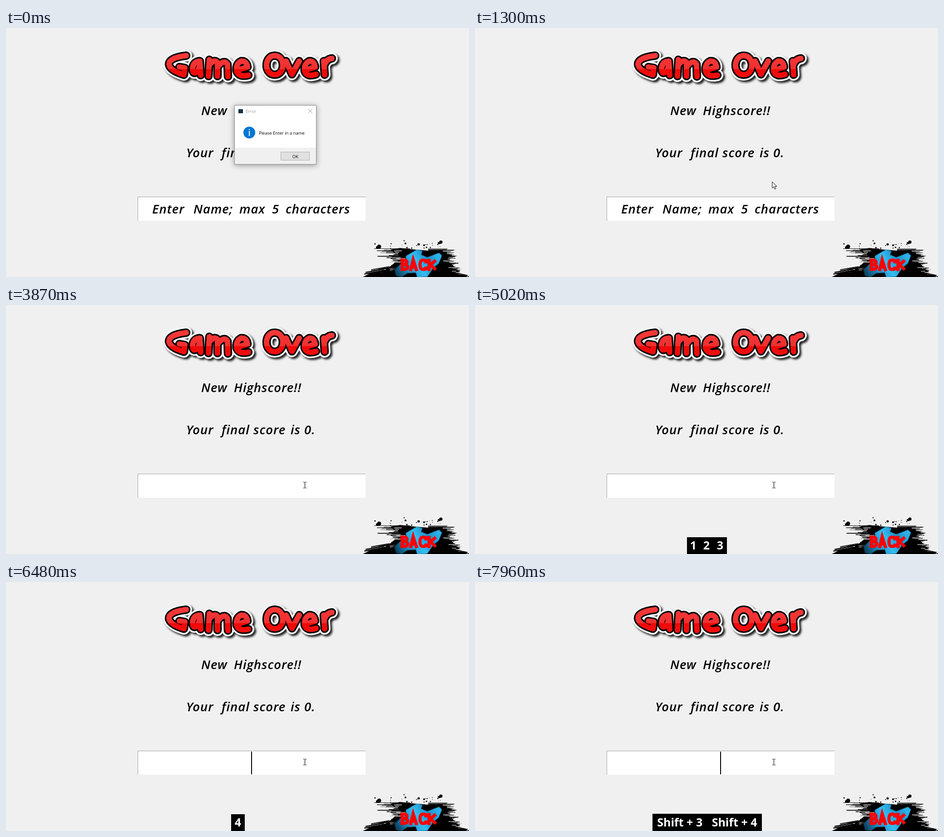
These frames come from a looping animation (1020 by 549 pixels, 8000 ms). An HTML page with a canvas:

```html
<!DOCTYPE html>
<html lang="en">
<head>
<meta charset="utf-8">
<title>Game Over</title>
<style>
html, body { margin: 0; width: 1020px; height: 549px; overflow: hidden; background: #f0f0f0; }
canvas { display: block; }
</style>
</head>
<body>
<canvas id="stage" width="1020" height="549"></canvas>
<script>
const W = 1020, H = 549, LOOP = 8000, STEP = 77;
const ctx = document.getElementById('stage').getContext('2d');
const UI = '"Open Sans", "Noto Sans", sans-serif';
const clamp = v => Math.max(0, Math.min(1, v));
const easeInOut = p => p * p * (3 - 2 * p);

let seed = 11;
const rnd = () => (seed = (seed * 16807) % 2147483647) / 2147483647;

function rect(c, x, y, w, h, fill) {
  c.fillStyle = fill;
  c.fillRect(x, y, w, h);
}
function frame(c, x, y, w, h, color) {
  c.strokeStyle = color;
  c.lineWidth = 1;
  c.strokeRect(x + .5, y + .5, w - 1, h - 1);
}
function dot(c, x, y, r, fill) {
  c.fillStyle = fill;
  c.beginPath();
  c.arc(x, y, r, 0, 7);
  c.fill();
}
function label(c, text, x, y, font, fill, align = 'left') {
  c.font = font;
  c.fillStyle = fill;
  c.textAlign = align;
  c.fillText(text, x, y);
}
function line(c, path, width, color) {
  c.lineWidth = width;
  c.strokeStyle = color;
  c.stroke(path);
}

// Each word sits at its own x, loosely spaced like handwriting.
function script(c, words, y) {
  c.save();
  c.letterSpacing = '1px';
  for (const [text, x] of words) label(c, text, x, y, 'italic 600 27.5px ' + UI, '#000');
  c.restore();
}

const title = [
  'M397 61 Q360 65 359 80 Q361 94 392 103 L394 88 L382 86',
  'M426 73 Q412 75 411 89 Q411 102 419 98 Q427 92 427 73 L429 104',
  'M448 70 L446 106 M447 83 Q458 67 466 76 L466 106 M467 85 Q480 68 488 80 L489 107',
  'M510 93 L532 86 Q530 72 518 73 Q506 79 508 95 Q513 109 534 104',
  'M592 61 C568 61 568 103 592 103 C616 103 616 61 592 61 Z',
  'M617 73 L630 102 L646 73',
  'M660 93 L681 86 Q679 72 668 73 Q656 79 658 95 Q663 109 683 102',
  'M700 73 L702 103 M701 83 Q706 68 718 67'
].map(d => new Path2D(d));

function drawTitle(c) {
  c.save();
  c.lineJoin = c.lineCap = 'round';
  c.save();
  c.shadowColor = '#222';
  c.shadowBlur = 4;
  c.shadowOffsetX = c.shadowOffsetY = 4;
  const all = new Path2D();
  title.forEach(p => all.addPath(p));
  line(c, all, 26, '#f7f7f7');
  c.restore();
  const red = c.createLinearGradient(0, 52, 0, 112);
  red.addColorStop(0, '#f53a3a');
  red.addColorStop(.64, '#f02f2f');
  red.addColorStop(.65, '#f00808');
  red.addColorStop(1, '#f01010');
  for (const p of title) line(c, p, 18.5, '#000');
  for (const p of title) line(c, p, 12, red);
  c.restore();
}

function drawBack(c) {
  const paper = '#f0f0f0';
  c.save();
  // Solid ink, then dry-brush streaks of ink and paper on both sides.
  c.fillStyle = '#000';
  c.fill(new Path2D('M846 489 L868 485 L905 489 L944 492 L964 489 L989 489 L972 497 L994 502 L976 510 L992 517 L984 524 L1003 533 L994 539 L1018 545 L1012 549 H786 L800 542 L824 537 L846 526 L858 516 L846 507 L858 498 Z'));
  for (let y = 486; y < 549; y += 1.5) {
    const low = clamp((y - 512) / 37);
    const left = y < 506 ? 811 + rnd() * 45 : 850 - low * 58 + rnd() * 28;
    const right = 975 + low * 30 + (rnd() - .5) * 40;
    rect(c, left, y, 890 - left, .5 + rnd() * 1.3, '#000');
    rect(c, 930, y, right - 930, .5 + rnd() * 1.5, '#000');
  }
  for (let i = 0; i < 26; i++) {
    const y = 490 + rnd() * 54, low = clamp((y - 512) / 37);
    rect(c, 835 - low * 25 + rnd() * 25, y, 8 + rnd() * 18, .5 + rnd(), paper);
    rect(c, 962 + low * 25 + rnd() * 22, y, 8 + rnd() * 20, .5 + rnd(), paper);
  }
  for (let i = 0; i < 22; i++) {
    const spread = rnd() - .5;
    dot(c, 900 + spread * 130, 474 + rnd() * 13, .4 + rnd() * 1.2, '#000');
  }
  for (const [x, y, r] of [[822, 482, 4.5], [818, 484, 3], [958, 472, 3.6], [953, 474, 2],
    [880, 475, 2], [877, 469, 1.2], [909, 477, 2.5], [921, 479, 2], [813, 476, 1.5]]) dot(c, x, y, r, '#000');
  c.strokeStyle = '#000';
  for (let i = 0; i < 18; i++) {
    const x = 788 + rnd() * 50, y = 531 + rnd() * 16;
    c.lineWidth = .6 + rnd() * 2;
    c.beginPath();
    c.moveTo(x, y);
    c.lineTo(x + 40, y - 7);
    c.stroke();
  }
  // Crossed blue paint.
  const blue = c.createLinearGradient(860, 545, 945, 495);
  blue.addColorStop(0, '#0b3c58');
  blue.addColorStop(.3, '#1d94cc');
  blue.addColorStop(.55, '#35bdf2');
  blue.addColorStop(.8, '#1b91c8');
  blue.addColorStop(1, '#2cb0e8');
  c.shadowColor = '#1887bb';
  c.shadowBlur = 3;
  c.fillStyle = blue;
  c.fill(new Path2D('M860 546 L857 533 L882 509 L881 503 L905 489 L917 492 L914 500 L928 506 L954 496 L960 502 L953 519 L941 529 L928 548 L906 549 L903 539 L884 540 L872 548 Z'));
  c.shadowBlur = 0;
  const word = new Path2D('M873 512 V533 M869 512 H880 Q887 516 880 521 H873 M873 522 H882 Q889 528 880 532 H869 M891 536 L897 511 L905 536 M892 527 H903 M925 519 V513 Q912 508 912 522 Q912 536 925 531 V526 M932 509 V536 M947 512 L935 522 L947 533');
  line(c, word, 7, '#f00');
  c.restore();
}

function makeScene() {
  const layer = document.createElement('canvas');
  layer.width = W;
  layer.height = H;
  const c = layer.getContext('2d');
  rect(c, 0, 0, W, H, '#f0f0f0');
  drawTitle(c);
  script(c, [['New', 430], ['Highscore!!', 502]], 192);
  script(c, [['Your', 397], ['final', 475], ['score', 545], ['is', 627], ['0.', 657]], 285);
  rect(c, 290, 372, 502, 53, '#fff');
  rect(c, 290, 372, 502, 1, '#a0a0a0');
  rect(c, 290, 372, 1, 53, '#a0a0a0');
  drawBack(c);
  return layer;
}

function drawDialog(c, hover, fade) {
  const closing = fade > 0;
  c.save();
  if (closing) {
    const s = 1 - fade * .025;
    c.translate(593, 235.5);
    c.scale(s, s);
    c.translate(-593, -235.5);
  }
  c.globalAlpha = 1 - fade;
  c.save();
  // Keep the soft shadow outside the window.
  const outside = new Path2D();
  outside.rect(0, 0, W, H);
  outside.rect(503, 170, 181, 131);
  c.clip(outside, 'evenodd');
  c.shadowColor = 'rgba(0,0,0,.38)';
  c.shadowBlur = 12;
  c.shadowOffsetY = 2;
  rect(c, 503, 170, 181, 131, '#888');
  c.restore();
  rect(c, 503, 170, 181, 131, '#fff');
  rect(c, 503, 264, 181, 37, '#f0f0f0');
  if (closing) rect(c, 503, 170, 181, 27, '#222');
  frame(c, 503, 170, 181, 131, closing ? '#555' : '#8b8b8b');
  rect(c, 512, 179, 10, 9, closing ? '#b8c8d4' : '#12324a');
  label(c, 'Error', 528, 187, '9.8px ' + UI, closing ? '#fff' : '#999');
  if (!closing) line(c, new Path2D('M665.5 178.5 l9 9 m0 -9 l-9 9'), 1, '#8f8f8f');
  dot(c, 536, 230.5, 13, '#0067b8');
  dot(c, 536, 230.5, 12.2, '#0078d7');
  rect(c, 535, 227, 2, 11, '#fff');
  rect(c, 535, 223, 2, 2, '#fff');
  label(c, 'Please Enter in a name', 557, 235, '9.5px ' + UI, '#000');
  rect(c, 605, 273, 64, 19, hover ? '#d8ebfa' : '#e1e1e1');
  frame(c, 605, 273, 64, 19, hover ? '#0078d7' : '#adadad');
  if (closing) {
    c.setLineDash([1, 1]);
    frame(c, 607, 275, 60, 15, '#333');
    c.setLineDash([]);
  }
  label(c, 'OK', 637.5, 286.5, '9.6px ' + UI, '#000', 'center');
  c.restore();
}

const arrow = new Path2D('M.5 .5 V14.5 L3.7 11.5 L6 16.8 L8.4 15.8 L6.1 10.6 H10.5 Z');
const beam = new Path2D('M-3 -6.5 H0 M1 -6.5 H4 M.5 -6 V6 M-3 6.5 H0 M1 6.5 H4');

function drawPointer(c, x, y, pressed) {
  const overField = y > 374;
  if (pressed) {
    c.save();
    c.globalCompositeOperation = 'multiply';
    dot(c, overField ? x - 2 : x, overField ? y - 1.5 : y, 10.2, '#ffff80');
    c.restore();
  }
  c.save();
  c.translate(x, y);
  if (overField) line(c, beam, 1.2, '#111');
  else {
    c.fillStyle = '#fff';
    c.fill(arrow);
    line(c, arrow, 1, '#000');
  }
  c.restore();
}

function pointerAt(t) {
  if (t < 917) {
    const p = easeInOut(clamp((t - 70) / 690));
    return [876 - 225 * p, 456 - 172 * p];
  }
  const p = easeInOut(clamp((t - 1010) / 440));
  return [651 + 7 * p, 284 + 113 * p];
}

const caretFlips = [2310, 2940, 3240, 3870, 4170, 4790, 5100, 5710, 6020, 6630, 6800, 7410, 7730];
const caretOn = t => caretFlips.filter(f => f <= t).length % 2 === 1;

const KEY_LIFE = 930;
const presses = [[4400, '1'], [4710, '2'], [5020, '3'], [5560, '4'],
  [6630, 'Shift + 1'], [7030, 'Shift + 2'], [7410, 'Shift + 3'], [7810, 'Shift + 4']];

function drawKeys(c, t) {
  const keys = presses.filter(([at]) => t >= at && t < at + KEY_LIFE).map(k => k[1]);
  if (!keys.length) return;
  const cell = k => k.length > 1 ? 120.4 : k === '1' ? 28 : 30;
  const width = keys.reduce((sum, k) => sum + cell(k), 0);
  let x = Math.round(511.3 - width / 2);
  const top = keys[0].length > 1 ? 511 : 512;
  rect(c, x, top, Math.round(width), H - top, '#000');
  for (const k of keys) {
    label(c, k, x + cell(k) / 2, 539, 'bold 25px ' + UI, '#fff', 'center');
    x += cell(k);
  }
}

const scene = makeScene();

function draw(t) {
  const held = t < 70 ? 0 : 70 + Math.floor((t - 70) / STEP) * STEP;
  ctx.drawImage(scene, 0, 0);
  if (t < 2310) script(ctx, [['Enter', 322], ['Name;', 413], ['max', 514], ['5', 586], ['characters', 616]], 409);
  const [x, y] = pointerAt(t < 1500 ? held : t);
  const fade = held < 917 ? 0 : .1 + (held - 917) / 620;
  if (held < 1225) drawDialog(ctx, x < 669 && y < 292, held < 1148 ? fade : .75);
  if (caretOn(t)) rect(ctx, 540, 374, 2, 50, '#000');
  drawKeys(ctx, t);
  if (t >= 70) drawPointer(ctx, x, y, (t >= 763 && t < 917) || (t >= 2310 && t < 2460));
}

function tick() {
  draw(performance.now() % LOOP);
  requestAnimationFrame(tick);
}
tick();
</script>
</body>
</html>
```
